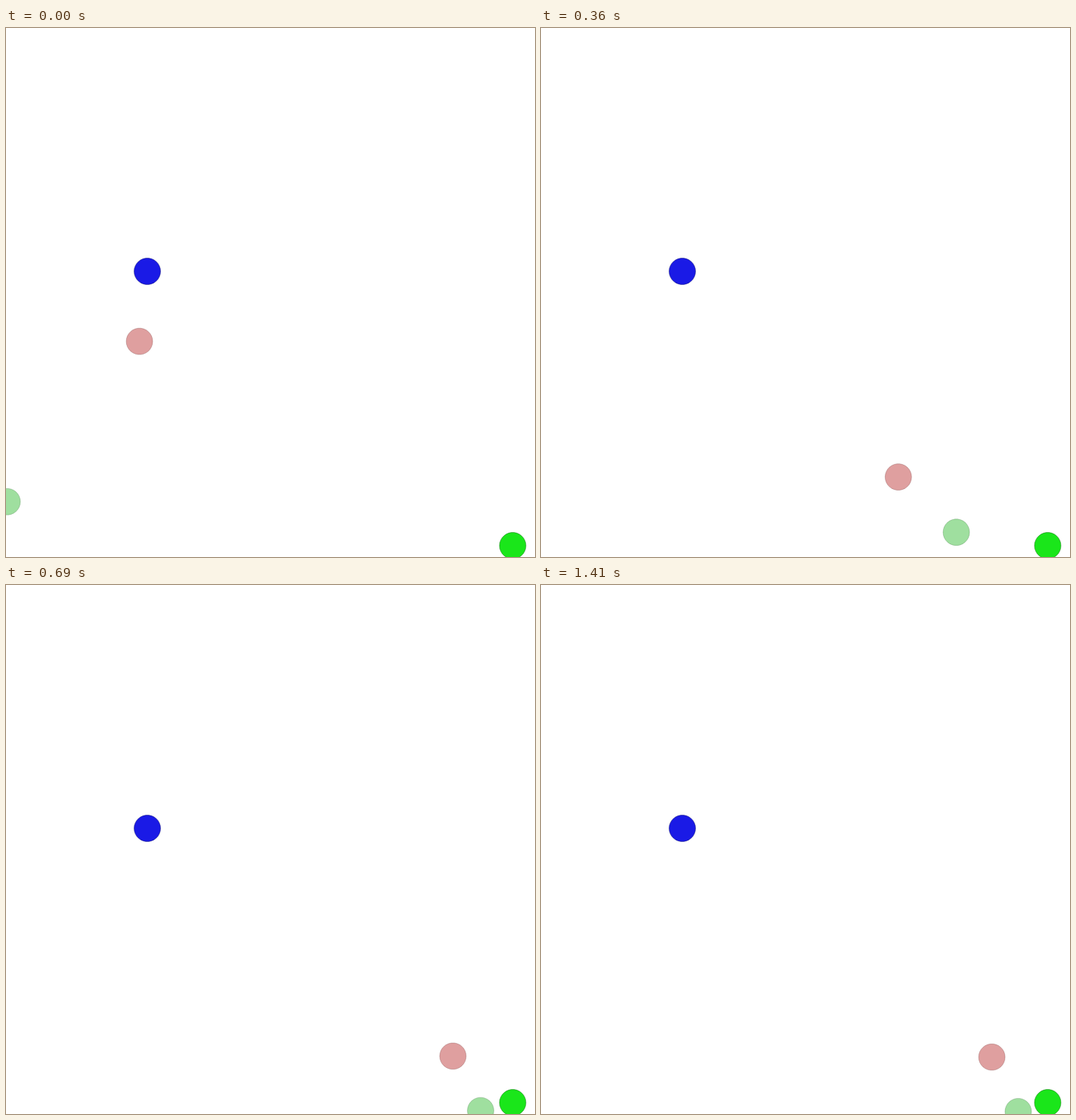
These frames come from a looping animation (700 by 700 pixels, 1.53 s). An HTML page with a canvas:

```html
<!DOCTYPE html>
<html>
<head>
<meta charset="utf-8">
<style>
html, body { margin: 0; width: 100%; height: 100%; overflow: hidden; background: #fff; }
canvas { display: block; }
</style>
</head>
<body>
<canvas id="stage" width="700" height="700"></canvas>
<script>
const ctx = document.getElementById('stage').getContext('2d');
const STEP = 30, LOOP = 1530, LAST_STEP = 47;
const RADIUS = 17.5, SIDES = 30, THRUST = 17.5, FRICTION = 0.75;
const DIRS = { R: [1, 0], U: [0, -1], D: [0, 1] };

// Each agent is pushed once per step, then coasts to rest.
const agents = [
  { x: 176.6, y: 414.7, rgb: [191, 64, 64], moves: 'RRRRUDDDDDRUR' },
  { x: 1.5, y: 626.8, rgb: [64, 191, 64], moves: 'RRRRRRRRRD' }
];
const landmarks = [
  { x: 187, y: 322, rgb: [26, 26, 230] },
  { x: 670.5, y: 685, rgb: [26, 230, 26] }
];

function position({ x, y, moves }, steps) {
  let vx = 0, vy = 0;
  for (let i = 0; i < steps; i++) {
    const [dx, dy] = DIRS[moves[i]] || [0, 0];
    vx = vx * FRICTION + dx * THRUST;
    vy = vy * FRICTION + dy * THRUST;
    x += vx;
    y += vy;
  }
  return [x, y];
}

function disc(x, y, rgb, alpha) {
  ctx.beginPath();
  for (let i = 0; i < SIDES; i++) {
    const a = 2 * Math.PI * i / SIDES;
    ctx.lineTo(x + RADIUS * Math.cos(a), y + RADIUS * Math.sin(a));
  }
  ctx.closePath();
  ctx.fillStyle = `rgba(${rgb}, ${alpha})`;
  ctx.fill();
  ctx.strokeStyle = `rgba(${rgb.map(c => c / 2 | 0)}, ${alpha / 2})`;
  ctx.stroke();
}

function draw() {
  const steps = Math.min(LAST_STEP, Math.floor(performance.now() % LOOP / STEP));
  ctx.clearRect(0, 0, 700, 700);
  for (const agent of agents) disc(...position(agent, steps), agent.rgb, 0.5);
  for (const mark of landmarks) disc(mark.x, mark.y, mark.rgb, 1);
  requestAnimationFrame(draw);
}
draw();
</script>
</body>
</html>
```
